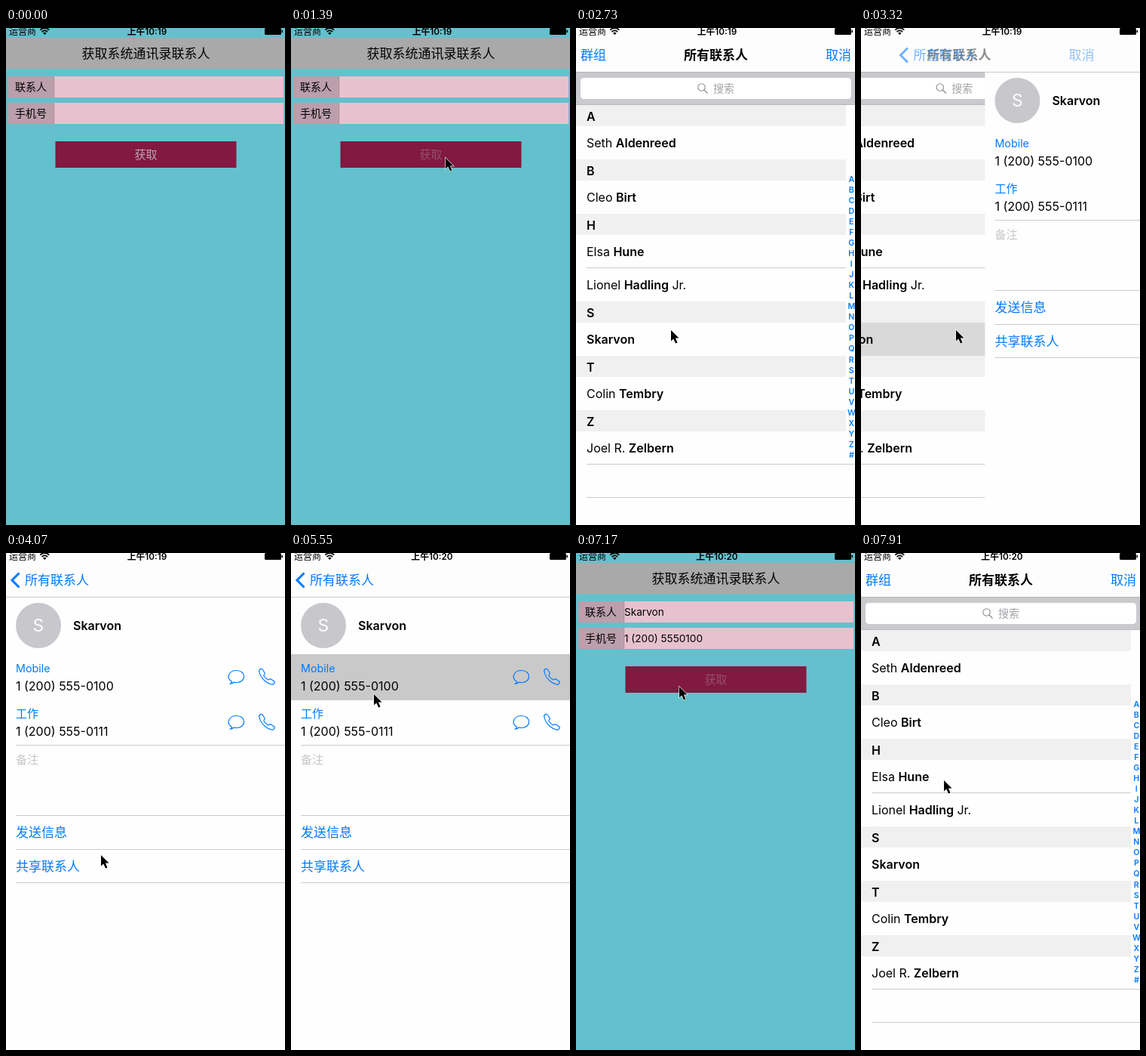
Recreate the animation shown at these times as an HTML page. Size 370 px wide and 658 px high, loop 8000 ms.

```html
<!DOCTYPE html>
<html lang="zh">
<head>
<meta charset="utf-8">
<style>
  html, body { margin: 0; width: 100%; height: 100%; overflow: hidden; background: #64c0cc; }
  svg { display: block; width: 100vw; height: 100vh; font: 16px Inter, "Noto Sans CJK SC", "Noto Sans CJK", sans-serif; }
  .bold { font-weight: 600; }
  .blue { fill: #007aff; }
  .icon { fill: none; stroke: #007aff; stroke-width: 1.2; stroke-linejoin: round; }
</style>
</head>
<body>
<svg id="stage" viewBox="0 0 370 658"></svg>
<script>
const rect = (x, y, w, h, fill, extra = '') =>
  `<rect x="${x}" y="${y}" width="${w}" height="${h}" fill="${fill}" ${extra}/>`;
const text = (x, y, size, content, extra = '') =>
  `<text x="${x}" y="${y}" font-size="${size}" ${extra}>${content}</text>`;
const rule = (x, y, right = 370) => rect(x, y, right - x, 1, '#cbcacd');
const group = (id, content) => `<g id="${id}">${content}</g>`;

const contact = 'Skarvon';
const phones = [['Mobile', '1 (200) 555-0100'], ['工作', '1 (200) 555-0111']];
const sections = [
  ['A', ['Seth *Aldenreed*']],
  ['B', ['Cleo *Birt*']],
  ['H', ['Elsa *Hune*', 'Lionel *Hadling* Jr.']],
  ['S', [`*${contact}*`]],
  ['T', ['Colin *Tembry*']],
  ['Z', ['Joel R. *Zelbern*']],
];

function formPage() {
  const field = (y, label, value) =>
    rect(3, y, 61, 28, '#bb9fab') + rect(64, y, 304, 28, '#e7c2ce') + rect(63.5, y, .7, 28, '#a58c97') +
    text(12, y + 19, 14, label) + text(64, y + 19, 13.6, value, 'class="value"');
  return rect(0, 0, 370, 658, '#64c0cc') + rect(0, 13, 370, 41, '#a9a9a9') +
    text(185.5, 40, 17, '获取系统通讯录联系人', 'text-anchor="middle"') +
    field(64, '联系人', contact) + field(99, '手机号', phones[0][1].replace('-', '')) +
    rect(65.5, 150, 240, 35, '#811940') + text(170.5, 173, 15, '获取', 'id="button"');
}

function listPage() {
  let y = 102;
  let out = rect(0, 58, 370, 600, '#fefefe') + rect(0, 58, 370, 44, '#c9c9ce') +
    rect(0, 58, 370, 1, '#b5b5b9') + rect(0, 101, 370, 1, '#b9b9be') +
    rect(6, 66, 359, 28, '#fff', 'rx="4.5"') +
    '<path d="M170.2 82.2l4.3 4.3" stroke="#8e8e93" stroke-width="1.4"/>' +
    '<circle cx="166.5" cy="78.5" r="4.7" fill="none" stroke="#8e8e93" stroke-width="1.1"/>' +
    text(182, 85, 14, '搜索', 'fill="#a3a3a8"') +
    rect(0, 390, 370, 44, '#d9d9d9', 'id="listHighlight"');
  for (const [letter, names] of sections) {
    out += rect(0, y, 358, 28, '#f0f0f0') + text(14, y + 21, 16, letter, 'class="bold"');
    y += 28;
    names.forEach((name, i) => {
      if (i) out += rule(14, y - 1, 358);
      out += text(14, y + 28, 16, name.replace(/\*(.+)\*/, '<tspan class="bold">$1</tspan>'));
      y += 44;
    });
  }
  out += rule(14, 577) + rule(14, 621);
  [...'ABCDEFGHIJKLMNOPQRSTUVWXYZ#'].forEach((letter, i) => {
    out += text(365.3, 204 + i * 14.03, 10.6, letter, 'class="blue bold" text-anchor="middle"');
  });
  return out;
}

function detailPage() {
  const bubble = 'M-5.5 6.2C-14 1 -9-8.5 .5-8.5C14-8.5 14 7.5 .5 7.5Q-1.5 7.5 -3 7Q-5 9.3 -8 9.2Q-5.5 8 -5.5 6.2Z';
  const handset = 'M-9.5-6.5C-11-9-7-12-5.5-10L-2.5-5.5C-1.5-4-4-3-3.5-1.5C-2 1 .5 3 2 3.8' +
    'C3.5 4.2 4 1.8 5.5 2.8L10 5.8C12 7.5 9 11 6.5 10C-1 8-8 1-9.5-6.5Z';
  const icon = (x, y, d) => `<path class="icon" transform="translate(${x} ${y})" d="${d}"/>`;
  let out = rect(0, 58, 370, 600, '#fefefe') + rule(0, 58) +
    '<circle cx="43" cy="96" r="30" fill="#c7c7cc"/>' +
    text(43, 104, 23, 'S', 'fill="#fff" text-anchor="middle"') +
    text(89, 102, 16, contact, 'class="bold"') +
    group('phoneHighlight', rect(0, 134, 370, 60, '#c9c9c9') + rule(0, 194));
  phones.forEach(([label, number], i) => {
    const y = 164 + i * 60;
    out += text(13, y - 6, i ? 15 : 14.3, label, 'class="blue"') + text(13, y + 18, 16, number) +
      icon(305, y, bubble) + icon(345.5, y, handset);
  });
  return out + rule(13, 254) + text(13, 279, 15, '备注', 'fill="#c7c7cc"') +
    rule(13, 347) + text(13, 376, 17, '发送信息', 'class="blue"') +
    rule(13, 392) + text(13, 421, 17, '共享联系人', 'class="blue"') + rule(13, 436);
}

const sheet = rect(0, -5, 370, 670, '#fdfdfd') + group('list', listPage()) + group('detail', detailPage()) +
  group('listBar', text(6, 42, 17, '群组', 'class="blue"') + text(331, 42, 17, '取消', 'class="blue"') +
    text(185.5, 42, 17, '所有联系人', 'font-weight="700" text-anchor="middle"')) +
  group('detailBar', '<path d="M17.5 26.5L8 36l9.5 9.5" fill="none" stroke="#007aff" stroke-width="3"/>' +
    text(25, 42, 17, '所有联系人', 'class="blue"'));

const statusBar = text(4, 9, 12, '运营商') +
  '<g fill="none" stroke="#000" stroke-width="1.7"><path d="M45.3 2.6Q51.3-2.6 57.3 2.6"/>' +
  '<path d="M47.5 5Q51.3 1.8 55.1 5"/></g><path d="M49 6.7Q51.3 4.9 53.6 6.7L51.3 9Z"/>' +
  text(187, 9, 11.8, '', 'id="clock" class="bold" text-anchor="middle"') +
  rect(343, 0, 22, 9, '#000', 'rx="1.5"') + rect(365.6, 2.8, 1.5, 3.4, '#000', 'rx=".7"');

const stage = document.getElementById('stage');
stage.innerHTML = formPage() + group('sheet', sheet) + statusBar + group('cursor',
  '<path d="M0 0V14.5L3.3 11.5L6 17.5L8.5 16.4L5.9 10.6H10.5Z" stroke="#fff" stroke-width="1.2" paint-order="stroke"/>');

const $ = id => document.getElementById(id);
const show = (node, visible) => node.setAttribute('visibility', visible ? 'inherit' : 'hidden');
const move = (id, x, y) => $(id).setAttribute('transform', `translate(${x} ${y})`);
const easeOut = (step, start, length) => 1 - (1 - Math.min(1, Math.max(0, (step - start) / length))) ** 2;

// step, x, y
const cursorPath = [
  [0, 330, 600], [4, 205, 172], [6.5, 205, 172], [8, 229, 260], [15, 126, 400], [27, 126, 400],
  [29, 97, 223], [30, 97, 223], [32, 110, 187], [40, 110, 187], [44, 137, 177], [45, 137, 177],
  [47, 136, 196], [50, 110, 301],
];

function cursorAt(step) {
  const next = cursorPath.findIndex(point => point[0] > step);
  if (next < 1) return cursorPath.at(next).slice(1);
  const [a, b] = [cursorPath[next - 1], cursorPath[next]];
  const u = (step - a[0]) / (b[0] - a[0]);
  return [1, 2].map(i => a[i] + (b[i] - a[i]) * u);
}

function draw(now) {
  const time = now % 8000;
  const step = time < 500 ? -1 : Math.floor((time - 500) / 148.2 + 1e-6);

  const raised = easeOut(step, 6.9, 2) - easeOut(step, 34.5, 2.5) + easeOut(step, 45, 2);
  const pushed = step < 40 ? easeOut(step, 18, 3) : 0;
  move('sheet', 0, 663 * (1 - raised));
  move('list', -111 * pushed, 0);
  move('detail', 370 * (1 - pushed), 0);
  move('detailBar', 100 * (1 - pushed), 0);
  move('listBar', -100 * pushed, 0);
  $('listBar').setAttribute('opacity', 1 - pushed);
  $('detailBar').setAttribute('opacity', pushed);

  show($('listHighlight'), step >= 17 && step < 22);
  show($('phoneHighlight'), step >= 34 && step < 40);
  document.querySelectorAll('.value').forEach(node => show(node, step >= 35));
  $('button').setAttribute('fill', step === 6 || step === 45 ? '#94506e' : '#bfa5b5');
  $('clock').textContent = step < 26 ? '上午10:19' : '上午10:20';

  show($('cursor'), step >= 0);
  move('cursor', ...cursorAt(step));
  requestAnimationFrame(draw);
}
draw(0);
</script>
</body>
</html>
```
